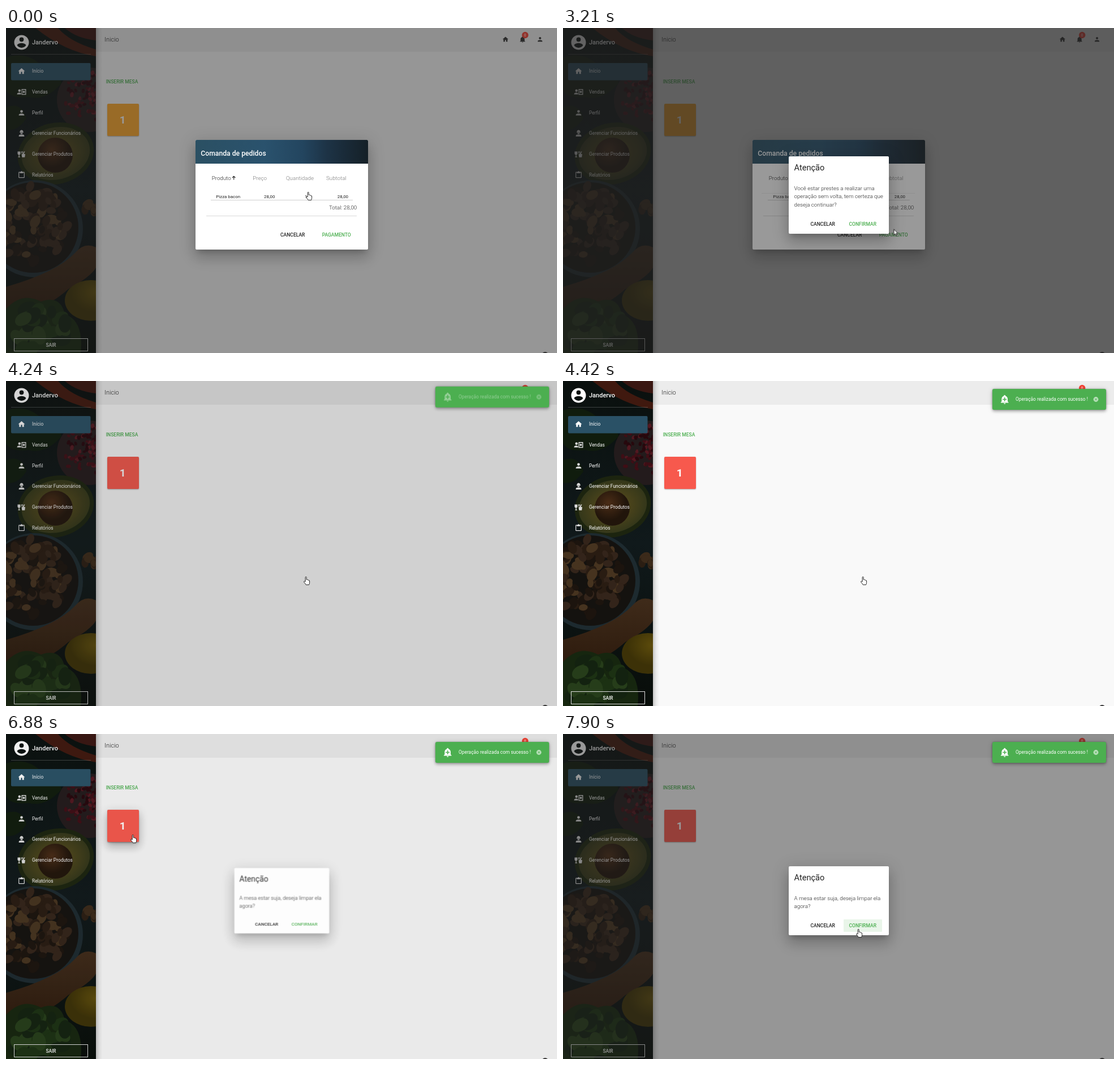
Animation, 974 px wide and 575 px high, one loop 8 s. Source, as an HTML page:

```html
<!DOCTYPE html>
<html lang="pt-BR">
<head>
<meta charset="utf-8">
<title>Comanda de pedidos</title>
<style>
html, body { margin: 0; width: 100%; height: 100%; overflow: hidden; background: #f9f9f9; }
#stage { position: absolute; left: 0; top: 0; width: 974px; height: 575px; overflow: hidden; }
#stage > * { position: absolute; }
svg { position: absolute; left: 0; top: 0; overflow: visible; }
text { font-family: Roboto, Arial, sans-serif; font-size: 8.54px; white-space: pre; }
.mid { text-anchor: middle; }
.btn { font-weight: 500; fill: #212121; }
.go { fill: #4caf50; }
.light { font-size: 9.76px; font-weight: 300; fill: #222; }
.dim { fill: #777; }
.cell { font-size: 7.93px; fill: #222; }
.title { font-size: 14.6px; fill: #222; }
.nav text { font-size: 8.4px; fill: #fff; }
.nav path, .nav use { fill: #ddd; }

/* Every timeline lasts one loop; 1% = 80 ms */
.t { animation: 8s linear infinite; }
.shade { inset: 0; background: #212121; opacity: 0; }
.dialog { background: #fff; border-radius: 2px;
  box-shadow: 0 7px 9px -4px rgba(0,0,0,.2), 0 15px 23px 2px rgba(0,0,0,.14), 0 5px 28px 5px rgba(0,0,0,.12); }

#card, #lift { left: 179px; top: 134px; width: 56px; height: 57px; border-radius: 2px; }
#card { animation-name: card; }
#lift { animation-name: lift;
  box-shadow: 0 5px 6px -3px rgba(0,0,0,.2), 0 10px 15px 1px rgba(0,0,0,.14), 0 4px 18px 3px rgba(0,0,0,.12); }
#shadeA { animation-name: shadeA; }
#shadeB { animation-name: shadeB; }
#order { left: 335px; top: 198px; width: 305px; height: 194px; animation-name: order; }
#order header { height: 42px; border-radius: 2px 2px 0 0;
  background: linear-gradient(90deg, #2b5063, #2a526d 40%, #23455f 62%, #1d3346 76%, #152027); }
#ask { left: 398.5px; top: 226.5px; width: 177px; height: 137px; animation-name: ask; }
#clean { left: 398.5px; top: 234px; width: 177px; height: 122px; animation-name: clean; }
#snack { left: 759px; top: 14px; width: 200.5px; height: 37px; border-radius: 3px; background: #4caf50; animation-name: snack;
  box-shadow: 0 0 3px rgba(0,0,0,.3), 0 3px 5px rgba(0,0,0,.22), 0 1px 10px rgba(0,0,0,.15); }
#note { animation-name: note; }
#rule { animation-name: rule; }
#pay { animation-name: pay; }
#yes { animation-name: yes; }
#wipe { animation-name: wipe; }
#cursor { animation-name: path; }
#hand { animation-name: hand; }
#arrow { animation-name: arrow; }

@keyframes card {
  0%, 51.8% { background: #ffa92c; box-shadow: 0 1px 2px rgba(0,0,0,.3); }
  51.9%, 100% { background: #f7594d; box-shadow: 0 1px 2px rgba(0,0,0,.3); }
}
@keyframes lift { 0%, 74.9% { opacity: 0; } 75.9%, 89.8% { opacity: 1; } 91.5%, 100% { opacity: 0; } }
@keyframes shadeA {
  0%, 50.9% { opacity: .46; animation-timing-function: ease; }
  55.25%, 85.5% { opacity: 0; animation-timing-function: ease; }
  89.4%, 100% { opacity: .46; }
}
@keyframes shadeB {
  0%, 23.4% { opacity: 0; animation-timing-function: ease; }
  27.4%, 50.9% { opacity: .46; animation-timing-function: ease; }
  55.25%, 100% { opacity: 0; }
}
@keyframes order {
  0%, 49.2% { opacity: 1; transform: none; animation-timing-function: cubic-bezier(.25,.8,.25,1); }
  52.5%, 100% { opacity: 0; transform: scale(.5); }
}
@keyframes ask {
  0%, 23.2% { opacity: 0; transform: scale(.5); animation-timing-function: cubic-bezier(.25,.8,.25,1); }
  27%, 49.2% { opacity: 1; transform: none; animation-timing-function: cubic-bezier(.25,.8,.25,1); }
  52.5%, 100% { opacity: 0; transform: scale(.5); }
}
@keyframes clean {
  0%, 84.4% { opacity: 0; transform: scale(.5); animation-timing-function: cubic-bezier(.25,.8,.25,1); }
  88.2%, 100% { opacity: 1; transform: none; }
}
@keyframes snack {
  0%, 51.5% { opacity: 0; transform: translateY(-14px); animation-timing-function: ease; }
  52.8% { opacity: 1; transform: translateY(-5px); animation-timing-function: ease-out; }
  55.25%, 100% { opacity: 1; transform: none; }
}
@keyframes note { 0%, 51.5% { opacity: 0; } 55.25%, 100% { opacity: 1; } }
@keyframes rule { 0%, 2% { opacity: 0; } 3%, 100% { opacity: 1; } }
@keyframes pay {
  0%, 18.4% { opacity: 0; } 19.5%, 20.5% { opacity: .12; }
  22.2%, 23.6% { opacity: .38; } 26.5%, 100% { opacity: 0; }
}
@keyframes yes { 0%, 42% { opacity: 0; } 43%, 48.1% { opacity: .12; } 49.5%, 100% { opacity: .38; } }
@keyframes wipe { 0%, 97.6% { opacity: 0; } 98.7%, 100% { opacity: .12; } }
@keyframes path {
  0%, .4% { transform: translate(534px, 290px); }
  2% { transform: translate(500px, 281px); }
  4% { transform: translate(424px, 266px); }
  5.2% { transform: translate(391px, 262px); }
  6.2% { transform: translate(410px, 268px); }
  8.6% { transform: translate(520px, 291px); }
  10.4%, 11.1% { transform: translate(562px, 298px); }
  13% { transform: translate(576px, 328px); }
  14.9%, 18.3% { transform: translate(587px, 354px); }
  18.8%, 40% { transform: translate(587px, 356px); }
  41.5% { transform: translate(560px, 351px); }
  42.9%, 64.8% { transform: translate(530px, 346px); }
  67% { transform: translate(498px, 318px); }
  70% { transform: translate(380px, 241px); }
  72.9% { transform: translate(254px, 183px); }
  74.4%, 89.4% { transform: translate(224px, 178px); }
  91.5%, 92.6% { transform: translate(322px, 203px); }
  95% { transform: translate(414px, 262px); }
  98.7%, 100% { transform: translate(522px, 345px); }
}
@keyframes hand {
  0%, .8% { opacity: 1; } .81%, 18.4% { opacity: 0; } 18.41%, 24.5% { opacity: 1; }
  24.51%, 41.6% { opacity: 0; } 41.61%, 64.9% { opacity: 1; } 64.91%, 73.9% { opacity: 0; }
  73.91%, 89.6% { opacity: 1; } 89.61%, 97.8% { opacity: 0; } 97.81%, 100% { opacity: 1; }
}
@keyframes arrow {
  0%, .8% { opacity: 0; } .81%, 18.4% { opacity: 1; } 18.41%, 24.5% { opacity: 0; }
  24.51%, 41.6% { opacity: 1; } 41.61%, 64.9% { opacity: 0; } 64.91%, 73.9% { opacity: 1; }
  73.91%, 89.6% { opacity: 0; } 89.61%, 97.8% { opacity: 1; } 97.81%, 100% { opacity: 0; }
}
</style>
</head>
<body>
<div id="stage">
  <svg width="974" height="575">
    <defs>
      <path id="home" d="M10 20V14H14V20H19V12H22L12 3L2 12H5V20Z"/>
      <path id="bell" d="M21 19V20H3V19L5 17V11C5 7.9 7 5.2 10 4.3V4A2 2 0 0 1 14 4V4.3C17 5.2 19 7.9 19 11V17ZM14 21A2 2 0 0 1 10 21"/>
      <path id="user" d="M12 4A4 4 0 0 1 12 12A4 4 0 0 1 12 4M12 14C16.4 14 20 15.8 20 18V20H4V18C4 15.8 7.6 14 12 14Z"/>
      <linearGradient id="edge"><stop stop-opacity=".2"/><stop offset=".5" stop-opacity=".06"/><stop offset="1" stop-opacity="0"/></linearGradient>
      <linearGradient id="veil" x2="0" y2="1"><stop stop-color="#0a100e"/><stop offset=".5" stop-color="#10191b"/><stop offset="1" stop-color="#080d09"/></linearGradient>
      <linearGradient id="wood" x2="0" y2="1"><stop stop-color="#3f2b1a"/><stop offset="1" stop-color="#2a180b"/></linearGradient>
      <radialGradient id="flesh"><stop offset=".5" stop-color="#4a431b"/><stop offset="1" stop-color="#34371a"/></radialGradient>
      <radialGradient id="pit" cx=".4" cy=".35"><stop stop-color="#4a2c16"/><stop offset="1" stop-color="#21150b"/></radialGradient>
      <radialGradient id="lemon" cx=".6" cy=".3"><stop stop-color="#5d4c0c"/><stop offset="1" stop-color="#3c3107"/></radialGradient>
      <clipPath id="side"><path d="M0 0H159V575H0Z"/></clipPath>
    </defs>
    <path fill="#f9f9f9" d="M0 0H974V575H0Z"/>
    <path fill="#ececec" d="M159 0H974V42H159Z"/>
    <path fill="url(#edge)" d="M159 0H171V575H159Z"/>

    <g clip-path="url(#side)">
      <path fill="url(#veil)" d="M0 0H159V575H0Z"/>
      <path fill="#40190f" d="M52 0H92Q112 24 159 38V50Q104 42 52 0Z"/>
      <path fill="#3a1712" d="M104 0H159V22Q124 18 104 0Z"/>
      <path fill="#101c0d" d="M0 52Q40 40 66 70Q92 62 98 98Q70 130 40 122Q8 126 0 110ZM0 140Q28 130 36 160Q20 184 0 180Z"/>
      <circle cx="147" cy="127" r="57" fill="#231b1c"/>
      <g id="berries"/>
      <ellipse cx="88" cy="222" rx="68" ry="54" fill="#1c240f" transform="rotate(-14 88 222)"/>
      <ellipse cx="88" cy="222" rx="61" ry="46" fill="url(#flesh)" transform="rotate(-14 88 222)"/>
      <circle cx="87" cy="225" r="31" fill="url(#pit)"/>
      <circle cx="50" cy="355" r="86" fill="#1d2a2f"/>
      <circle cx="48" cy="353" r="80" fill="#14120f"/>
      <g id="nuts"/>
      <g id="spare"/>
      <path fill="url(#wood)" d="M159 388Q138 378 122 398Q90 432 0 458V520Q70 498 110 462Q150 440 159 424Z"/>
      <ellipse cx="150" cy="482" rx="46" ry="36" fill="url(#lemon)"/>
      <path fill="#16260f" d="M0 497Q28 466 62 484Q96 472 104 506Q138 518 132 575H0Z"/>
      <g id="leaves"/>
      <path fill="none" stroke="#fff" stroke-opacity=".2" d="M9 46.5H150"/>
      <rect x="9" y="62" width="140.5" height="30.5" rx="2" fill="#2a5166"/>
      <g class="nav">
        <path fill-rule="evenodd" style="fill:#fff" transform="translate(11.9 9.9) scale(1.3)" d="M12 2A10 10 0 0 1 12 22A10 10 0 0 1 12 2M12 5A3 3 0 0 0 12 11A3 3 0 0 0 12 5M12 12.9C10 12.9 6 14 6 16A7.2 7.2 0 0 0 18 16C18 14 14 12.9 12 12.9"/>
        <text x="46" y="29.3" style="font-size:11px;font-weight:500">Jandervo</text>
        <use href="#home" transform="translate(20.3 69.2) scale(.6)" style="fill:#fff"/>
        <path fill-rule="evenodd" transform="translate(19.5 106)" d="M4.3 2.5A2.3 2.3 0 0 1 4.3 7.1A2.3 2.3 0 0 1 4.3 2.5M0 11.6Q0 8.3 4.3 8.3Q7.2 8.3 7.2 10V11.6ZM8 2H16V12.2H8ZM9.4 3.4V10.8H14.6V3.4ZM12 5A2 2 0 0 1 12 9A2 2 0 0 1 12 5"/>
        <use href="#user" transform="translate(20.3 142.8) scale(.6)"/>
        <path transform="translate(20.3 179.3) scale(.6)" d="M7 8Q7 2 12 2Q17 2 17 8H18V9H6V8ZM8 10H16Q15.5 14 12 14Q8.5 14 8 10M12 15C16.4 15 20 16.5 20 18.5V21H4V18.5C4 16.5 7.6 15 12 15Z"/>
        <path transform="translate(20.5 216.5)" d="M0 2H5V6Q5 7.5 3.3 7.8V11H4.5V12.2H1V11H2V7.8Q0 7.5 0 6ZM7 6.5H9L12 1.5L13 2L11 6.5H13.5L12.7 12.2H7.8ZM6.5 1.5H7.6V5.5H6.5ZM8.6 1.5H9.7V5.5H8.6Z"/>
        <path fill-rule="evenodd" transform="translate(20.3 252.7) scale(.6)" d="M19 3H14.8A3 3 0 0 0 9.2 3H5A2 2 0 0 0 3 5V19A2 2 0 0 0 5 21H19A2 2 0 0 0 21 19V5A2 2 0 0 0 19 3M7 7H17V5H19V19H5V5H7Z"/>
        <text x="46" y="79.3">Início</text>
        <text x="46" y="116">Vendas</text>
        <text x="46" y="152.7">Perfil</text>
        <text x="46" y="189.3">Gerenciar Funcionários</text>
        <text x="46" y="226">Gerenciar Produtos</text>
        <text x="46" y="262.5">Relatórios</text>
        <rect x="14.5" y="549.5" width="130" height="22" fill="none" stroke="#ddd"/>
        <text class="mid" x="79.5" y="563.5" style="font-weight:500">SAIR</text>
      </g>
    </g>

    <text x="174" y="24.3" style="font-size:11px;font-weight:300;fill:#222">Inicio</text>
    <g fill="#333">
      <use href="#home" transform="translate(876.8 14) scale(.51)"/>
      <use href="#bell" transform="translate(907 14) scale(.51)"/>
      <use href="#user" transform="translate(937.9 14) scale(.51)"/>
    </g>
    <circle cx="917.7" cy="12.5" r="5.7" fill="#f44336"/>
    <text class="mid" x="917.7" y="14.8" style="font-size:6.5px;fill:#fff">0</text>
    <text class="btn go" x="176.7" y="97.7">INSERIR MESA</text>
    <circle cx="953" cy="579" r="6" fill="#333"/>
  </svg>

  <div id="lift" class="t"></div>
  <div id="card" class="t"><svg><text class="mid" x="27.2" y="34.5" style="font-size:19px;font-weight:700;fill:#fff">1</text></svg></div>
  <div id="shadeA" class="shade t"></div>

  <div id="order" class="dialog t">
    <header></header>
    <svg>
      <text x="9.3" y="27.5" style="font-size:12.2px;font-weight:500;fill:#fff">Comanda de pedidos</text>
      <text class="light" x="28.7" y="70.5">Produto</text>
      <path d="M67.7 70.5V64.5M65 67L67.7 64.2L70.4 67" fill="none" stroke="#222" stroke-width="1.1"/>
      <text class="light dim" x="101.3" y="70.5">Preço</text>
      <text class="light dim" x="160" y="70.5">Quantidade</text>
      <text class="light dim" x="231" y="70.5">Subtotal</text>
      <path id="rule" class="t" d="M16 94.5H287" stroke="#ececec"/>
      <path d="M27 106.5H278" stroke="#cfcfcf"/>
      <path d="M19 134.5H285" stroke="#d9d9d9"/>
      <text class="cell" x="36.3" y="103.3">Pizza bacon</text>
      <text class="cell" x="121" y="103.3">28,00</text>
      <text class="cell" x="193" y="103.3">1</text>
      <text class="cell" x="250.7" y="103.3">28,00</text>
      <text class="light" x="285.3" y="123" text-anchor="end">Total: 28,00</text>
      <rect id="pay" class="t" x="214" y="157.5" width="70" height="22" rx="1" fill="#4caf50"/>
      <text class="btn" x="150" y="171.3">CANCELAR</text>
      <text class="btn go" x="223.7" y="171.3">PAGAMENTO</text>
    </svg>
  </div>
  <div id="shadeB" class="shade t"></div>

  <div id="ask" class="dialog t">
    <svg>
      <text class="title" x="9.5" y="25">Atenção</text>
      <text class="light" x="9.5" y="59.5">Você estar prestes a realizar uma</text>
      <text class="light" x="9.5" y="74.2">operação sem volta, tem certeza que</text>
      <text class="light" x="9.5" y="88.8">deseja continuar?</text>
      <rect id="yes" class="t" x="97" y="108.5" width="68" height="22" rx="1" fill="#4caf50"/>
      <text class="btn" x="38.5" y="122.5">CANCELAR</text>
      <text class="btn go" x="106.5" y="122.5">CONFIRMAR</text>
    </svg>
  </div>

  <div id="clean" class="dialog t">
    <svg>
      <text class="title" x="9.5" y="25">Atenção</text>
      <text class="light" x="9.5" y="59.5">A mesa estar suja, deseja limpar ela</text>
      <text class="light" x="9.5" y="74.2">agora?</text>
      <rect id="wipe" class="t" x="97" y="94" width="68" height="22" rx="1" fill="#4caf50"/>
      <text class="btn" x="38.5" y="107.7">CANCELAR</text>
      <text class="btn go" x="106.5" y="107.7">CONFIRMAR</text>
    </svg>
  </div>

  <div id="snack" class="t">
    <svg><g id="note" class="t" fill="#fff">
      <use href="#bell" transform="translate(12.6 9.3) scale(.76)"/>
      <path d="M21.7 15V22M18.2 18.5H25.2" stroke="#4caf50" stroke-width="1.5"/>
      <text x="41" y="21.3" style="font-size:8.4px">Operação realizada com sucesso !</text>
      <circle cx="183" cy="18.5" r="4.4" opacity=".6"/>
      <path d="M181.3 16.8L184.7 20.2M184.7 16.8L181.3 20.2" stroke="#4caf50"/>
    </g></svg>
  </div>

  <svg width="974" height="575">
    <g id="cursor" class="t" fill="#fff" stroke="#111" stroke-width=".9" stroke-linejoin="round">
      <path id="arrow" class="t" d="M.4 .5V10.5L2.7 8.4L4.3 11.8L5.8 11.1L4.3 7.9H7.3Z"/>
      <path id="hand" class="t" transform="translate(-4 0)" d="M3.2 9V1.5Q3.2 .4 4.2 .4Q5.2 .4 5.2 1.5V5.3Q6.8 4.8 7.1 5.9Q8.6 5.5 8.9 6.7Q10.6 6.4 10.6 8V10.5Q10.6 12.4 9.5 14.6H4.3Q3.4 12.6 .8 9.9Q.2 8.6 1.2 8.2Q2.2 7.9 3.2 9Z"/>
    </g>
  </svg>
</div>
<script>
let seed = 7;
const rnd = () => (seed = seed * 16807 % 2147483647) / 2147483647;

// Scatters ovals over a disc
function scatter(id, n, cx, cy, r, size, tones) {
  let out = '';
  for (let i = 0; i < n; i++) {
    const a = rnd() * 6.283, d = Math.sqrt(rnd()) * r;
    const x = cx + d * Math.cos(a), y = cy + d * Math.sin(a), s = size * (.7 + rnd() * .5);
    out += `<ellipse rx="${s}" ry="${s * .7}" fill="${tones[i % tones.length]}" transform="translate(${x} ${y}) rotate(${rnd() * 180})"/>`;
  }
  document.getElementById(id).innerHTML = out;
}
scatter('berries', 110, 147, 125, 47, 4, ['#3f0e15', '#27080d', '#521820']);
scatter('nuts', 110, 45, 346, 68, 10, ['#33241a', '#1c140e', '#46331f', '#291c12']);
scatter('spare', 8, 149, 322, 12, 9, ['#2b1e13', '#3b2a1a']);
scatter('leaves', 40, 60, 534, 48, 15, ['#1c3113', '#132210', '#263d1a']);
</script>
</body>
</html>
```
